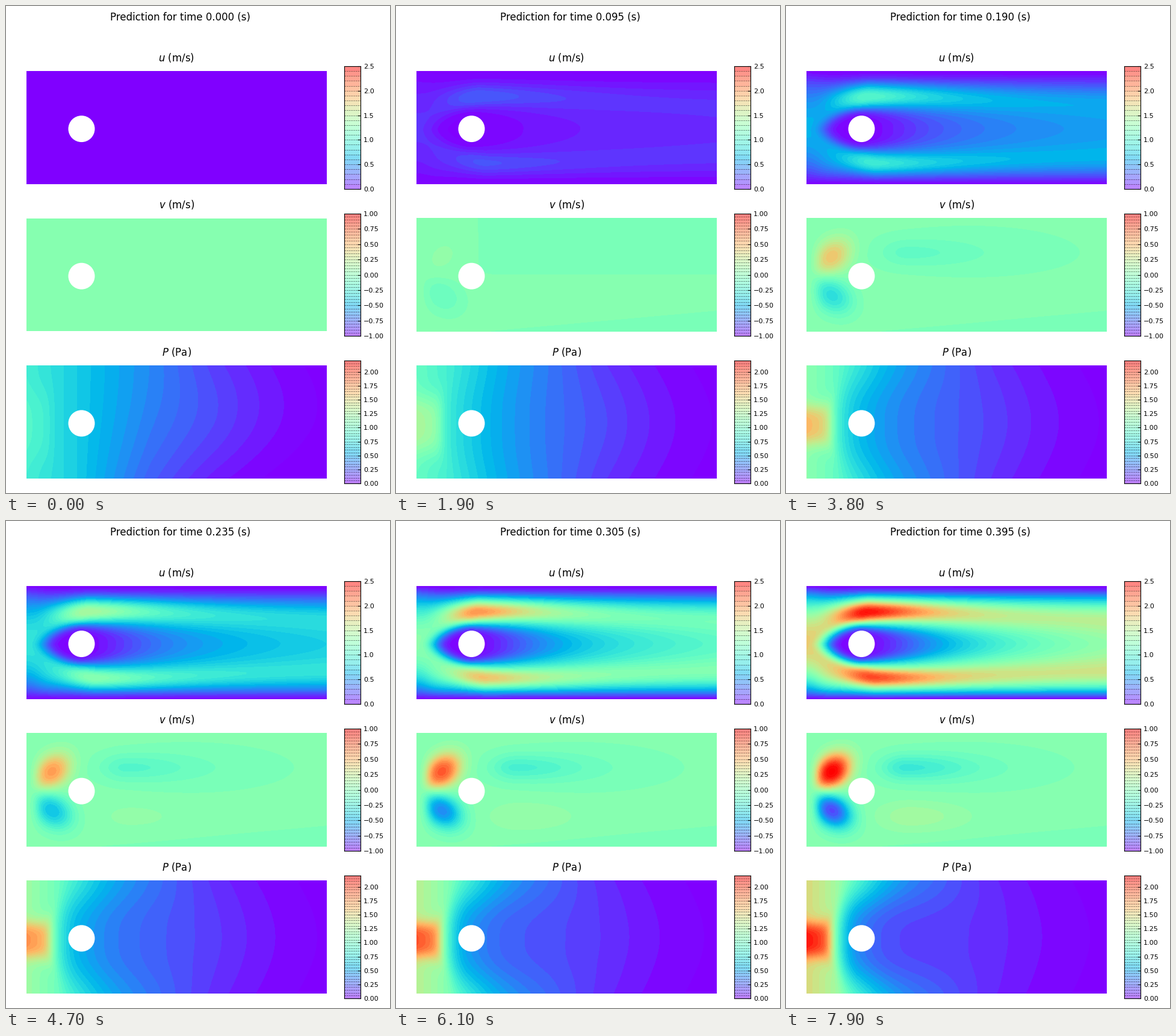
Write a matplotlib script that moves like this. It is 638 px wide and 809 px high and loops after 8000 ms.

```python
import numpy as np
import matplotlib.pyplot as plt
from matplotlib.animation import FuncAnimation
from matplotlib.patches import Circle

W, H, DPI = 638, 809, 100
FRAMES, DT = 80, 0.005
T_END = (FRAMES - 1) * DT
LEFT, RIGHT, HEIGHT = 34, 533, 187.8
ROW, ROW_HEIGHT, ROW_GAP = 100, 203.82, 40.77
INSET = 8.0

plt.rcParams["font.family"] = "DejaVu Sans"
fig = plt.figure(figsize=(W / DPI, H / DPI), dpi=DPI, facecolor="white")
ax = fig.add_axes([0, 0, 1, 1])
ax.set_xlim(0, W)
ax.set_ylim(H, 0)
ax.axis("off")

xs = np.linspace(LEFT, RIGHT, 220)
ys = np.linspace(0, HEIGHT, 100)
X, Y = np.meshgrid(xs, ys)
BELOW = HEIGHT - Y


def sigmoid(z):
    return 1 / (1 + np.exp(-np.clip(z, -50, 50)))


def inflow(t):
    return 1 - np.cos(2 * np.pi * t)


def ease(t, start, power):
    return np.clip((t - start) / (T_END - start), 0, 1) ** power


# Horizontal velocity: wall layers, two jets beside the cylinder, a wake.
def jet(dist, x0, d0, drift, amp, width):
    dx = X - x0
    back, front = np.maximum(dx, 0), np.maximum(-dx, 0)
    tail = 0.12
    down = tail + (amp - tail) * np.exp(-(back / 170) ** 1.4)
    along = np.where(dx < 0, amp * np.exp(-(dx / 55) ** 2), down)
    ridge = d0 + drift * back + 0.12 * front
    return along * np.exp(-((dist - ridge) / (width + 0.012 * back)) ** 2)


WALLS = (1.05 * (1 - np.exp(-(Y / 40) ** 1.4))
         * (1 - np.exp(-(BELOW / 27) ** 1.2)))
JETS = jet(Y, 137, 40, 0.035, 0.69, 19) + jet(BELOW, 148, 33, 0.028, 0.5, 17)
PARABOLA = 4 * Y * BELOW / HEIGHT ** 2
INLET = np.exp(-((X - LEFT) / 25) ** 2)


def field_u(t):
    s = inflow(t)
    dx, dy = X - 125.5, Y - 97
    back, front = np.maximum(dx, 0), np.maximum(-dx, 0)
    outer = WALLS + JETS * (1 + 0.7 * (1 - s / inflow(T_END)))
    outer = INLET * PARABOLA + (1 - INLET) * outer
    length = 120 + 85 * (t / T_END) ** 2
    core = 1 / (1 + (back / length) ** 1.6)
    half = 33 + 0.02 * back
    r = ((front / 62) ** 1.7 + (np.abs(dy) / half) ** 1.7) ** (1 / 1.7)
    power = 2 + 3.2 * np.exp(-back / 60)
    wake = core * np.exp(-np.log(2) * r ** power)
    return s * outer * (1 - wake) - 0.012


# Vertical velocity: a pair of strong lobes upstream, a weak pair behind.
def tilted(cx, cy, a, b, angle):
    c, s = np.cos(np.radians(angle)), np.sin(np.radians(angle))
    dx, dy = X - cx, Y - cy
    r = np.hypot((dx * c + dy * s) / a, (dy * c - dx * s) / b)
    return np.exp(-r ** 2.3)


def drop(cx, cy, front, back, b):
    dx = X - cx
    return np.exp(-(dx / np.where(dx < 0, front, back)) ** 2
                  - ((Y - cy) / b) ** 2)


GATE = 1 - np.exp(-((X - LEFT) / 16) ** 2)
UP = GATE * tilted(76, 64, 36, 26, -42) * sigmoid((94 - Y) / 5)
DOWN = GATE * tilted(76, 128, 38, 28, 35) * sigmoid((Y - 98) / 5)
WAKE_DOWN = drop(197, 57, 39, 115, 22)
WAKE_UP = drop(207, 138, 52, 85, 23)
PAST = sigmoid((X - 135) / 8)
EARLY = 0.02 * (1 - PAST) - 0.02 * PAST * np.tanh((95 - Y) / 15)
LATE = 0.02 - 0.045 * np.exp(-(((X - 310) / 180) ** 2
                               + ((Y - 57) / 45) ** 2) ** 2)
STRIP = 0.04 * sigmoid((Y - 187 + 0.09 * (X - 150)) / 5) * PAST


def field_v(t):
    early = np.clip((0.2 - t) / 0.06, 0, 1)
    rest = early * EARLY + (1 - early) * LATE - STRIP
    return (0.001 + rest * min(1, t / 0.05)
            + ease(t, 0.09, 0.8) * UP
            - 0.51 * inflow(t) ** 0.85 * DOWN
            - 0.25 * ease(t, 0.15, 0.5) * WAKE_DOWN
            + 0.12 * ease(t, 0.15, 1) * WAKE_UP)


# Pressure: a falling ramp, a step upstream, a hot spot and a low behind.
def field_p(t):
    s, rel = inflow(t), Y / HEIGHT
    start = max(0, 1 - t / 0.095)
    lean = 70 * start * rel ** 2 * np.clip((X - 120) / 120, 0, 1)
    bulge = 35 * (np.sin(np.pi * rel) - 0.6) * np.clip((X - 250) / 100, 0, 1)
    x = X + lean - bulge
    ramp = np.clip((RIGHT - x) / (RIGHT - LEFT), 0, 1) ** (1.4 + t)
    wall = 0.85 * ramp + 1.72 * t * sigmoid((125 - x) / 30)
    spot = 0.08 + 0.58 * np.sin(np.pi / 2 * t / T_END)
    low = np.exp(-(np.maximum(x - 115, 0) / 100) ** 1.3) * sigmoid((x - 85) / 8)
    mid = spot * sigmoid((74 - x) / 5) - 0.33 * s * low
    near = 30 + 30 * np.exp(-(t / 0.13) ** 2)
    width = near + (80 - near) * sigmoid((X - 84) / 8)
    return wall + mid * np.exp(-(np.abs(Y - 99) / width) ** 3) - 0.008


def bar(top, lo, hi, step, tick, fmt):
    cax = fig.add_axes([562 / W, 1 - (top + ROW_HEIGHT) / H,
                        27 / W, ROW_HEIGHT / H])
    edges = np.linspace(lo, hi, round((hi - lo) / step) + 1)
    mids = (edges[:-1] + edges[1:]) / 2
    cax.pcolormesh([0, 1], edges, mids[:, None], cmap="rainbow",
                   vmin=lo, vmax=hi, alpha=0.5, linewidth=0)
    cax.hlines(edges[1:-1], 0, 1, colors="k", linestyles="dashed",
               linewidth=0.5, alpha=0.6)
    cax.set_xlim(0, 1)
    cax.set_ylim(lo, hi)
    cax.set_xticks([])
    cax.yaxis.tick_right()
    ticks = np.arange(lo, hi + 0.01, tick)
    labels = [fmt.format(v).replace("-", "\u2212") for v in ticks]
    cax.set_yticks(ticks, labels)
    cax.tick_params(axis="y", direction="in", labelsize=8)


# name, field, low, high, colour step, bar step, tick step, tick format
SPECS = (
    ("$u$ (m/s)", field_u, 0, 2.5, 0.05, 0.1, 0.5, "{:.1f}"),
    ("$v$ (m/s)", field_v, -1, 1, 0.05, 0.05, 0.25, "{:.2f}"),
    ("$P$ (Pa)", field_p, 0, 2.2, 0.05, 0.05, 0.25, "{:.2f}"),
)
panels = []
for k, (name, field, lo, hi, step, bar_step, tick, fmt) in enumerate(SPECS):
    row = ROW + k * (ROW_HEIGHT + ROW_GAP)
    bar(row, lo, hi, bar_step, tick, fmt)
    ax.text(283.3, row - 8.33, name, fontsize=12, ha="center", va="baseline")
    ax.add_patch(Circle((125.5, row + 104.1), 22, color="white", lw=0,
                        zorder=5))
    levels = np.linspace(lo, hi, round((hi - lo) / step) + 1)
    panels.append((field, row + INSET, levels))
title = ax.text(289.7, 10, "", fontsize=12, ha="center", va="top")

shown = []


def draw(i):
    t = i * DT
    while shown:
        shown.pop().remove()
    for field, top, levels in panels:
        shown.append(ax.contourf(xs, ys + top, field(t), levels=levels,
                                 cmap="rainbow", extend="both", zorder=1))
    ax.set_xlim(0, W)
    ax.set_ylim(H, 0)
    title.set_text(f"Prediction for time {t:.3f} (s)")
    return []


anim = FuncAnimation(fig, draw, frames=FRAMES, init_func=lambda: draw(0),
                     interval=100, repeat=True, repeat_delay=0, blit=False)
plt.show()
```
